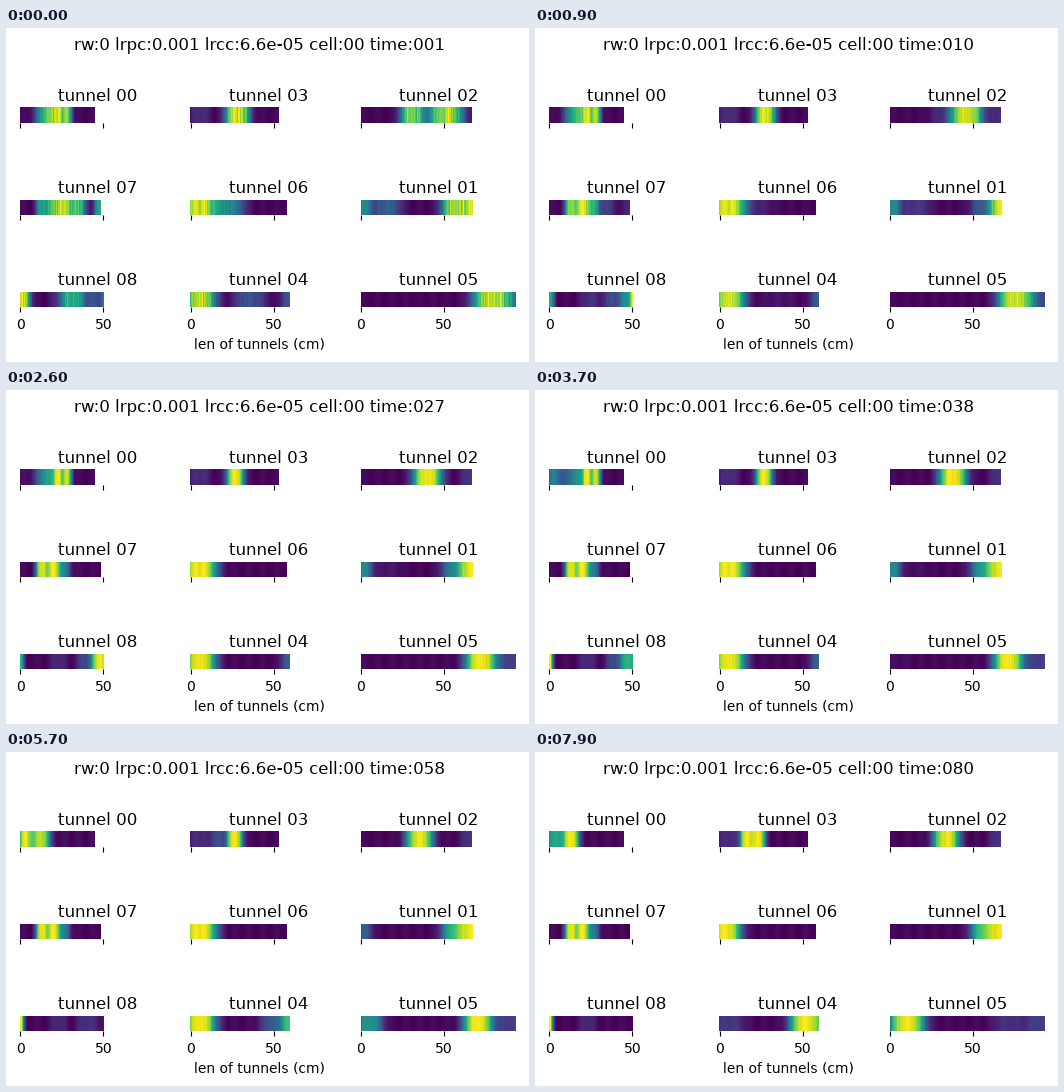
Animation, 523 px wide and 334 px high, one loop 8 s. Source, as a matplotlib script:

```python
import numpy as np
import matplotlib.pyplot as plt
from matplotlib.animation import FuncAnimation

W, H, DPI = 523, 334, 100
FRAMES, INTERVAL = 80, 100
PX_PER_CM = 1.657
LEFT, TOP = 14.4, 79.3
COL_STEP, ROW_STEP = 170.3, 92.3
BAR_H = 15.5

plt.rcParams["font.family"] = "DejaVu Sans"
plt.rcParams["text.hinting"] = "native"


def hump(x, centre, width):
    """Flat-topped field, positions in cm."""
    return np.exp(-np.abs((x - centre) / width) ** 3)


def fade(t, tau):
    return np.exp(-t / tau)


def rise(t, middle):
    return 1 / (1 + np.exp((middle - t) / 2.5))


def bell(t, middle, span):
    return np.exp(-((t - middle) / span) ** 2)


def union(*fields):
    """Smooth union that never exceeds 1."""
    rest = 1
    for f in fields:
        rest = rest * (1 - f)
    return 1 - rest


# Firing rate along each tunnel x (cm) at step t

def rate_00(x, t):
    early = 1 - rise(t, 44)
    return union(hump(x, 19, 9) * (0.35 + 0.5 * fade(t, 30)) * early,
                 hump(x, 23, 2.5) * 0.9 * early,
                 hump(x, 28.5, 3) * 0.85 * early,
                 hump(x, 3, 6) * 0.4 * rise(t, 34),
                 hump(x, 3, 2.5) * bell(t, 49, 8),
                 hump(x, 9, 9) * 0.4 * rise(t, 46),
                 hump(x, 13.5, 4.5) * rise(t, 57))


def rate_03(x, t):
    centre = 27 + 1.5 * fade(t, 15) - 4 * rise(t, 64)
    return union(hump(x, centre, 5 + 2.5 * fade(t, 15)),
                 hump(x, 16.5, 4) * rise(t, 60),
                 hump(x, 6, 6) * 0.12)


def rate_02(x, t):
    return union(hump(x, 33 + 18 * fade(t, 28), 8 + 3 * fade(t, 25)),
                 hump(x, 31, 7.5) * 0.95 * fade(t, 4),
                 hump(x, 67, 7) * 0.15 * (1 - fade(t, 5)))


def rate_07(x, t):
    return union(hump(x, 13.5, 4) * (1 - 0.4 * fade(t, 10)),
                 hump(x, 20.2, 4) * (1 - 0.25 * fade(t, 5)),
                 hump(x, 26, 4.5) * (0.4 + 0.5 * fade(t, 10)),
                 hump(x, 34, 6) * 0.75 * fade(t, 6),
                 hump(x, 49, 4) * 0.65 * fade(t, 5))


def rate_06(x, t):
    late = rise(t, 70)
    return union(hump(x, 6 - 1.8 * late, 10.5 - 1.2 * late),
                 hump(x, 22, 11) * 0.5 * fade(t, 5))


def rate_01(x, t):
    grown = 1 - fade(t, 32)
    return union(hump(x, 68, 6.5 + 4 * grown),
                 hump(x, 57, 8.5) * (0.85 * fade(t, 4) + 0.75 * grown),
                 hump(x, 2, 5) * 0.45 * (1 - rise(t, 58)),
                 hump(x, 16, 9) * 0.28 * fade(t, 14))


def rate_08(x, t):
    start = 0.6 + 0.4 * rise(t, 32) + 0.4 * fade(t, 3)
    return union(hump(x, 0, 2.5 + 3.5 * fade(t, 6)) * min(start, 1),
                 hump(x, 31, 7) * 0.58 * fade(t, 4),
                 hump(x, 50.5, 2) * 0.9 * bell(t, 9, 8),
                 hump(x, 48, 5) * bell(t, 24, 18),
                 hump(x, 40, 6) * 0.2 * (1 - rise(t, 58)),
                 hump(x, 23, 5) * 0.1)


def rate_04(x, t):
    moved = rise(t, 60)
    return union(hump(x, 6, 10) * (1 - 0.85 * moved),
                 hump(x, 52, 9.5) * moved,
                 hump(x, 36, 10) * 0.27 * fade(t, 5),
                 hump(x, 60, 5) * (0.3 + 0.2 * rise(t, 45)))


def rate_05(x, t):
    late = rise(t, 70)
    new = 0.3 * rise(t, 44) + 0.7 * rise(t, 59)
    return union(hump(x, 70.5 + 9.5 * fade(t, 18), 9 + 3.5 * fade(t, 18)) * (1 - 0.9 * late),
                 hump(x, 5 + 5.5 * late, 8.5 + 2.5 * late) * new,
                 hump(x, 92, 12) * 0.18)


# (number, length in cm, rate), row by row
TUNNELS = [
    (0, 45.5, rate_00), (3, 53.5, rate_03), (2, 67, rate_02),
    (7, 49, rate_07), (6, 58.5, rate_06), (1, 68, rate_01),
    (8, 50.5, rate_08), (4, 60.5, rate_04), (5, 94, rate_05),
]

fig = plt.figure(figsize=(W / DPI, H / DPI), dpi=DPI, facecolor="white")
ax = fig.add_axes([0, 0, 1, 1])


def label(x, y, text, size):
    return ax.text(x, y, text, fontsize=size, ha="center", va="baseline")


class Bar:
    def __init__(self, index, number, length, rate):
        row, col = divmod(index, 3)
        left, top = LEFT + col * COL_STEP, TOP + row * ROW_STEP
        bottom = round(top + BAR_H)
        self.rate = rate
        self.x = np.arange(0.25, length, 0.5)
        self.grain = np.random.default_rng(number).normal(size=self.x.size)

        extent = (int(left), int(left + length * PX_PER_CM), bottom, round(top))
        self.image = ax.imshow(self.values(0), extent=extent, aspect="auto",
                               vmin=0, vmax=1, cmap="viridis",
                               interpolation="nearest")
        label(left + 77.7, top - 6.6, f"tunnel {number:02d}", 12)
        for cm in (0, 50):
            x = left + cm * PX_PER_CM
            ax.plot([x, x], [bottom, bottom + 4.9], color="black", lw=0.8,
                    solid_capstyle="butt", zorder=0)
            if row == 2:
                label(x, 301, str(cm), 10)

    def values(self, t):
        """Grainy at first, smoother with time, scaled to its own peak."""
        r = self.rate(self.x, t) + 0.015 * (1 + np.sin(self.x * 0.75))
        r = r * (1 + (0.015 + 0.055 * fade(t, 12)) * self.grain)
        return (r / r.max())[None, :]


bars = [Bar(i, *spec) for i, spec in enumerate(TUNNELS)]
label(253.5, 321, "len of tunnels (cm)", 10)
title = label(253.7, 22, "", 12)

ax.set_xlim(0, W)
ax.set_ylim(H, 0)
ax.axis("off")


def update(frame):
    for bar in bars:
        bar.image.set_data(bar.values(frame))
    title.set_text(f"rw:0 lrpc:0.001 lrcc:6.6e-05 cell:00 time:{frame + 1:03d}")
    return [*(bar.image for bar in bars), title]


anim = FuncAnimation(fig, update, frames=FRAMES, interval=INTERVAL,
                     repeat=True, repeat_delay=0)
plt.show()
```
